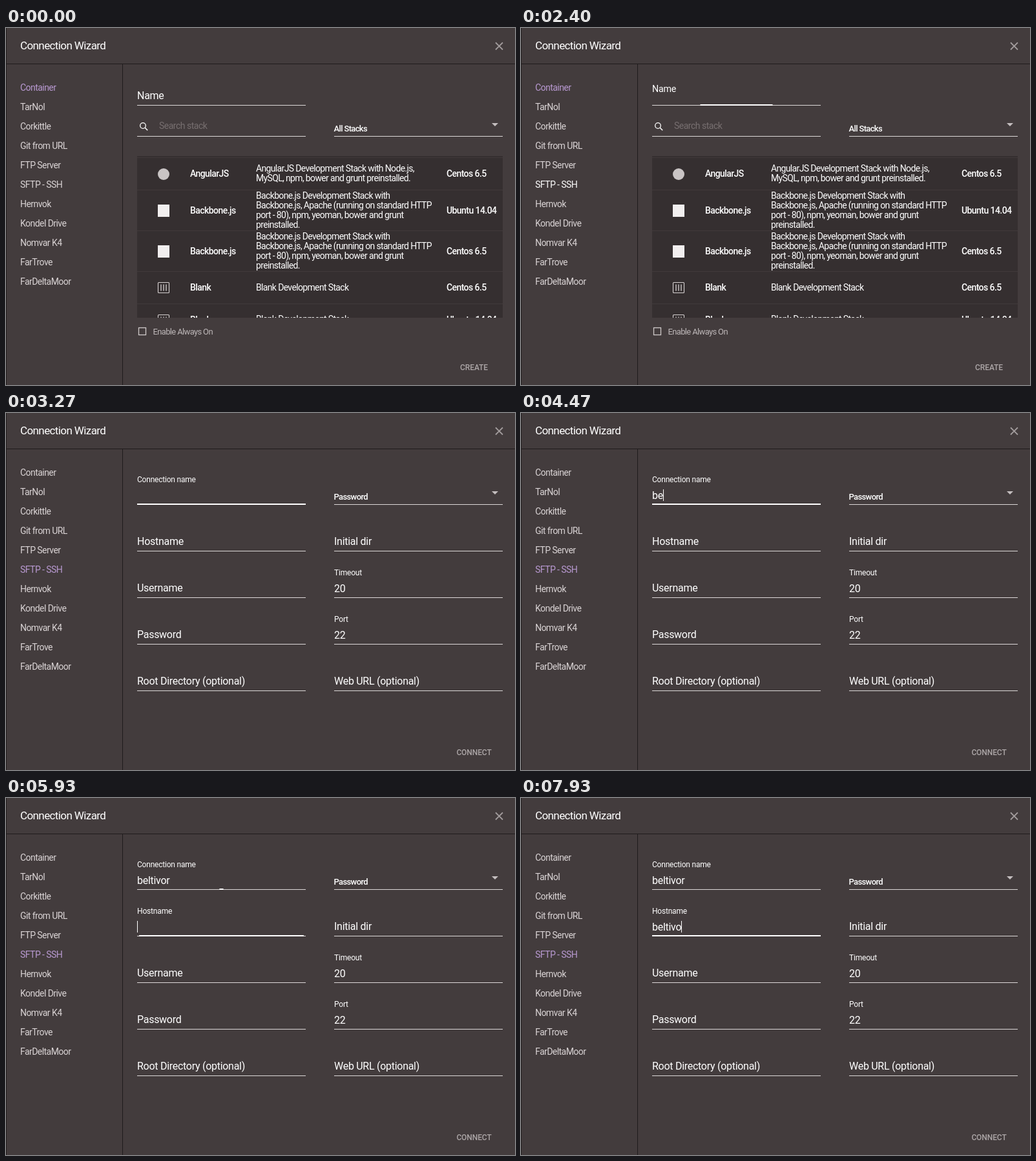
An HTML page for the animation above (8 s loop, 788 by 552 pixels).

```html
<!DOCTYPE html>
<html lang="en">
<head>
<meta charset="utf-8">
<title>Connection Wizard</title>
<style>
  html, body { margin: 0; width: 100%; height: 100%; overflow: hidden; background: #433c3d; }
  svg { display: block; width: 788px; height: 552px; font-family: Roboto, Arial, sans-serif; }
  text { fill: #fff; white-space: pre; }
  .title { font-size: 17px; letter-spacing: -.6px; }
  .side { font-size: 14px; letter-spacing: -.55px; fill: #dad4d5; }
  .field { font-size: 16px; letter-spacing: -.28px; }
  .small { font-size: 12px; letter-spacing: -.2px; }
  .pick { font-size: 13px; letter-spacing: -.65px; font-weight: 500; }
  .strong { font-size: 14px; letter-spacing: -.57px; font-weight: 500; }
  .desc { font-size: 14px; letter-spacing: -.65px; }
  .hint { font-size: 14px; letter-spacing: -.5px; fill: #776f70; }
  .check { font-size: 13px; letter-spacing: -.65px; fill: #bdb7b8; }
  .btn { font-size: 12px; letter-spacing: -.1px; font-weight: 500; fill: #aca6a7; text-anchor: middle; }
</style>
</head>
<body>
<svg id="stage" viewBox="0 0 788 552"></svg>
<script>
const LOOP = 8000, EASE = 250, BLINK = 500;
const stage = document.getElementById('stage');

function add(parent, tag, attrs, content) {
  const el = document.createElementNS('http://www.w3.org/2000/svg', tag);
  for (const k in attrs) el.setAttribute(k, attrs[k]);
  if (content) el.textContent = content;
  parent.appendChild(el);
  return el;
}
const label = (p, cls, x, y, s) => add(p, 'text', { class: cls, x, y }, s);
const rect = (p, x, y, width, height, fill) => add(p, 'rect', { x, y, width, height, fill });
const path = (p, d, stroke, w) => add(p, 'path', { d, fill: 'none', stroke, 'stroke-width': w });
const show = (el, on) => el.setAttribute('visibility', on ? 'visible' : 'hidden');

const underline = (p, x, y) => rect(p, x, y, 261, 1, '#dcd8d8');
const arrow = (p, y) => add(p, 'path', { d: `M752 ${y}h10l-5 5z`, fill: '#c4bebf' });

// Text field with a floating label, a focus bar and a caret
function field(p, x, y, name) {
  underline(p, x, y);
  return {
    x, y,
    tag: add(p, 'text', { class: 'field' }, name),
    bar: rect(p, x, y - 1, 0, 2, '#fff'),
    value: label(p, 'field', x, y - 8, ''),
    caret: rect(p, x, y - 23, 1, 18, '#fff')
  };
}

// Frame of the dialog
rect(stage, 0, 0, 788, 552, '#433c3d');
rect(stage, 0, 0, 1, 552, '#1f1b1c');
rect(stage, 0, 55, 788, 1, '#1f1b1c');
rect(stage, 180, 56, 1, 496, '#1f1b1c');
label(stage, 'title', 22, 33, 'Connection Wizard');
path(stage, 'M758 22.5l11 11m0-11l-11 11', '#a39d9e', 1.8);

const items = ['Container', 'TarNol', 'Corkittle', 'Git from URL', 'FTP Server', 'SFTP - SSH',
  'Hernvok', 'Kondel Drive', 'Nomvar K4', 'FarTrove', 'FarDeltaMoor']
  .map((s, i) => label(stage, 'side', 22, 97 + i * 30, s));

// Stack page
const stackPage = add(stage, 'g', {});
const nameField = field(stackPage, 203, 119, 'Name');
add(stackPage, 'circle', { cx: 212, cy: 151, r: 4.3, fill: 'none', stroke: '#fff', 'stroke-width': 1.3 });
path(stackPage, 'M215.2 154.2l4 4', '#fff', 1.5);
label(stackPage, 'hint', 237, 156, 'Search stack');
underline(stackPage, 203, 167);
label(stackPage, 'pick', 507.5, 160, 'All Stacks');
arrow(stackPage, 147);
underline(stackPage, 508, 167);

const clip = add(stage, 'clipPath', { id: 'listClip' });
rect(clip, 203, 198, 566, 250, '#000');
const list = add(stackPage, 'g', { 'clip-path': 'url(#listClip)' });
rect(list, 203, 198, 566, 250, '#352f30');
rect(list, 203, 200, 566, 1, '#413a3b');

const backbone = ['Backbone.js Development Stack with', 'Backbone.js, Apache (running on standard HTTP',
  'port - 80), npm, yeoman, bower and grunt', 'preinstalled.'];
const blank = ['Blank Development Stack'];
const rows = [
  [225, 250, 'AngularJS', ['AngularJS Development Stack with Node.js,',
    'MySQL, npm, bower and grunt preinstalled.'], 'Centos 6.5'],
  [281.5, 313, 'Backbone.js', backbone, 'Ubuntu 14.04'],
  [344.5, 376, 'Backbone.js', backbone, 'Centos 6.5'],
  [401, 426, 'Blank', blank, 'Centos 6.5'],
  [450.5, 476, 'Blank', blank, 'Ubuntu 14.04']
];
for (const [mid, edge, name, lines, os] of rows) {
  if (name === 'Blank') {
    const y = Math.round(mid) - 7.5;
    add(list, 'rect', { x: 235.5, y, width: 17, height: 16, rx: 1, fill: 'none', stroke: '#d8d3d3', 'stroke-width': 1.1 });
    for (const x of [240, 244, 248]) path(list, `M${x} ${y + 3}v10`, '#d8d3d3', 1.3);
  } else if (name === 'AngularJS') {
    add(list, 'circle', { cx: 244, cy: 226, r: 9, fill: '#c9c4c4' });
  } else {
    rect(list, 235, Math.round(mid) - 9, 18, 19, '#f2efef');
  }
  label(list, 'strong', 285, mid + 5, name);
  lines.forEach((s, i) => label(list, 'desc', 387, mid + 4.8 + (i - (lines.length - 1) / 2) * 15, s));
  label(list, 'strong', 682, mid + 5, os);
  rect(list, 203, edge, 566, 1, '#413a3b');
}
add(stackPage, 'rect', { x: 205.5, y: 463.5, width: 11, height: 11, fill: 'none', stroke: '#cfcaca', 'stroke-width': 1.3 });
label(stackPage, 'check', 227.5, 474, 'Enable Always On');
label(stackPage, 'btn', 724.5, 529, 'CREATE');

// SFTP page
const sftpPage = add(stage, 'g', {});
const connField = field(sftpPage, 203, 141, 'Connection name');
const hostField = field(sftpPage, 203, 213, 'Hostname');
const still = [[203, 285, 'Username'], [203, 357, 'Password'], [203, 429, 'Root Directory (optional)'],
  [508, 213, 'Initial dir'], [508, 429, 'Web URL (optional)']];
for (const [x, y, s] of still) {
  underline(sftpPage, x, y);
  label(sftpPage, 'field', x, y - 9, s);
}
for (const [y, s, v] of [[285, 'Timeout', '20'], [357, 'Port', '22']]) {
  underline(sftpPage, 508, y);
  label(sftpPage, 'small', 508, y - 34.5, s);
  label(sftpPage, 'field', 508, y - 8, v);
}
label(sftpPage, 'pick', 507.5, 134, 'Password');
arrow(sftpPage, 121);
underline(sftpPage, 508, 141);
label(sftpPage, 'btn', 724.5, 529, 'CONNECT');

// Timeline in ms
const HOVER = 2000, SELECT = 2470, SWAP = 2530;
const WORD = 'beltivor';
const inputs = [
  { f: nameField, focus: 1530, blur: 2306, keys: [] },
  { f: connField, focus: 2730, blur: 5730, keys: [4330, 4430, 4530, 4630, 4730, 4870, 5000, 5150] },
  { f: hostField, focus: 5730, blur: Infinity, keys: [6870, 7070, 7270, 7470, 7600, 7730, 7870] }
];

// cubic-bezier(.4, 0, .2, 1)
function ease(p) {
  if (p <= 0) return 0;
  if (p >= 1) return 1;
  let lo = 0, hi = 1, u;
  for (let i = 0; i < 20; i++) {
    u = (lo + hi) / 2;
    const x = 1.2 * u * (1 - u) ** 2 + .6 * u * u * (1 - u) + u ** 3;
    if (x < p) lo = u; else hi = u;
  }
  return 3 * u * u - 2 * u ** 3;
}

function drawInput({ f, focus, blur, keys }, t, visible) {
  const on = ease((t - focus) / EASE) * (1 - ease((t - blur) / EASE));
  const pressed = keys.filter(k => t >= k);
  const text = WORD.slice(0, pressed.length);
  const up = text ? 1 : on;
  f.tag.setAttribute('transform', `translate(${f.x} ${f.y - 9 - 25.5 * up}) scale(${1 - .25 * up})`);
  f.bar.setAttribute('x', f.x + 130.5 * (1 - on));
  f.bar.setAttribute('width', 261 * on);
  if (f.value.textContent !== text) f.value.textContent = text;
  const since = t - (pressed.length ? pressed[pressed.length - 1] : focus);
  const lit = t >= focus && t < blur && Math.floor(since / BLINK) % 2 === 0;
  const end = text ? f.value.getComputedTextLength() : 0;
  f.caret.setAttribute('x', Math.round(f.x + end));
  show(f.caret, visible && lit);
}

function draw(t) {
  const swapped = t >= SWAP;
  show(stackPage, !swapped);
  show(sftpPage, swapped);
  const picked = t >= SELECT;
  items[0].style.fill = picked ? '' : '#b99ad2';
  items[5].style.fill = picked ? '#b99ad2' : t >= HOVER ? '#fff' : '';
  inputs.forEach((s, i) => drawInput(s, t, swapped === i > 0));
}

const start = performance.now();
function tick() {
  draw((performance.now() - start) % LOOP);
  requestAnimationFrame(tick);
}
tick();
</script>
</body>
</html>
```
